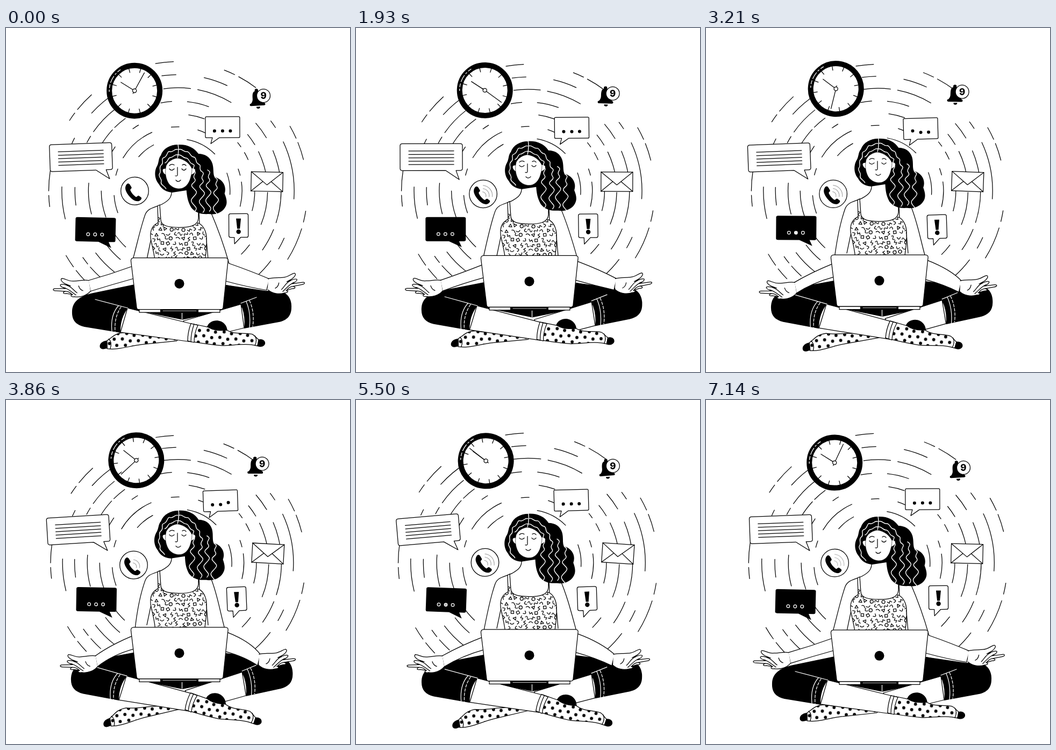
An HTML page for the animation above (7210 ms loop, 640 by 640 pixels).

```html
<!DOCTYPE html>
<html lang="en">
<head>
<meta charset="utf-8">
<title>Calm among notifications</title>
<style>
html, body { margin: 0; width: 100%; height: 100%; overflow: hidden; background: #fff; }
svg { display: block; width: 100%; height: 100%; }
.line { fill: none; stroke: #000; }
.paper { fill: #fff; stroke: #000; }
.ink { fill: #000; stroke: none; }
.chalk { fill: none; stroke: #fff; }
</style>
</head>
<body>
<svg viewBox="0 0 640 640" stroke-width="1.25" stroke-linecap="round" stroke-linejoin="round">
  <defs>
    <pattern id="dots" width="30" height="22" patternUnits="userSpaceOnUse" patternTransform="translate(0 -2) rotate(6)">
      <circle cx="6" cy="5" r="2.900"/><circle cx="21" cy="7" r="2.900"/>
      <circle cx="13" cy="16" r="2.900"/><circle cx="27" cy="18" r="2.900"/>
    </pattern>
    <clipPath id="shirtClip"><use href="#shirt"/></clipPath>
    <path id="strand" d="M0 0c11 6 -3 9 3 16s-10 9 -4 16s11 8 5 15s-10 9 -4 16s9 8 4 14"/>
  </defs>
  <rect width="640" height="640" fill="#fff"/>
  <g id="rings" class="line"></g>

  <g id="clock">
    <circle class="paper" r="47" stroke-width="10"/>
    <path class="chalk" d="M-47 2A47 47 0 0 1 -24 -40.500" stroke-dasharray="3 4 6 4 13 4" stroke-width="1.3"/>
    <g id="ticks" class="line"></g>
    <path class="line" d="M0 0L-25.500 -15.500"/>
    <path id="minute" class="line" d="M-6 0H38"/>
    <circle class="paper" r="3.600"/>
  </g>

  <g id="bell">
    <g id="bellBody" class="ink">
      <circle cx="-1" cy="-14" r="3.200"/>
      <path d="M-9 1C-9 -9 -8 -13 -1 -13S8 -9 8 1C8 6 11 8 13 11H-13C-11 8 -9 6 -9 1Z"/>
      <rect x="-15" y="10" width="29" height="4.500" rx="2.200"/>
      <path d="M-3 16.500H4Q4 20 .5 20T-3 16.500Z"/>
    </g>
    <circle class="paper" cx="12.500" cy="-4" r="12.500"/>
    <text x="12.500" y="2" text-anchor="middle" font-family="Inter, 'Open Sans', sans-serif" font-weight="800" font-size="17">9</text>
  </g>

  <g id="chat">
    <path class="paper" d="M-30 -20H30Q32 -20 32 -18V17Q32 19 30 19H-6L-22 30L-19 19H-30Q-32 19 -32 17V-18Q-32 -20 -30 -20Z"/>
    <g id="chatDots" class="ink"><circle cx="-15" cy="6.500" r="3"/><circle cy="6.500" r="3"/><circle cx="14.500" cy="6.500" r="3"/></g>
  </g>

  <g id="note">
    <path class="paper" d="M-54 -25H54Q58 -25 58 -21V21Q58 25 54 25H46L52 42L27 25H-54Q-58 25 -58 21V-21Q-58 -25 -54 -25Z"/>
    <path class="line" d="M-42 -11.500H42M-42 -5H42M-42 1.300H42M-42 7.500H42M-42 13.800H42"/>
  </g>

  <g id="dark">
    <path class="ink" d="M-34 -23H34Q37.500 -23 37.500 -20V19Q37.500 22 34 22H25L30 33L6 22H-34Q-37.500 22 -37.500 19V-20Q-37.500 -23 -34 -23Z"/>
    <g id="typing" fill="#fff" stroke="#fff" fill-opacity="0"><circle cx="-13.500" cy="8.500" r="2.800"/><circle cx="-.5" cy="8.500" r="2.800"/><circle cx="12.500" cy="8.500" r="2.800"/></g>
  </g>

  <g id="phone">
    <circle class="paper" r="25.800"/>
    <path class="ink" d="M-16 -11C-14 -15 -11 -15 -9 -12L-6 -7C-5 -4 -9 -4 -8 -1C-6 4 -2 8 2 11C4 12 5 8 8 9L12 12C14 14 11 18 7 19C-1 20 -8 13 -13 6C-17 0 -19 -6 -16 -11Z"/>
    <g id="signal" fill="none" stroke="#aaa"><path d="M-1 -4A7 7 0 0 1 5 5"/><path d="M0 -10A13 13 0 0 1 11 5"/><path d="M0 -16A19 19 0 0 1 17 5"/></g>
  </g>

  <g id="mail">
    <rect class="paper" x="-29.500" y="-18" width="59" height="36"/>
    <path class="line" d="M-29.500 -18L0 6L29.500 -18M-29.500 18L-8 0M29.500 18L8 0"/>
  </g>

  <g id="alert">
    <path class="paper" d="M-15 -22H15Q18 -22 18 -19V19Q18 22 15 22H4L-7.500 34L-8 22H-15Q-18 22 -18 19V-19Q-18 -22 -15 -22Z"/>
    <path class="ink" d="M-4.500 -13H4.500L2.500 6H-2.500Z"/><circle class="ink" cy="11.500" r="4.200"/>
  </g>

  <path id="lap" class="ink" d="M200 487L240 478H408L450 486L440 520L328 543L220 521Z"/>
  <g id="rightLeg">
    <path class="paper" d="M437 514L330 545L345 582L443 558Z"/>
    <path class="ink" d="M402 477L484 489H506C523 490 532 504 531 520C531 536 522 544 508 547L443 559Q446 533 436 513L400 521Z"/>
    <path class="chalk" d="M466 501L437 512M447 509Q456 530 453 557"/>
    <path class="chalk" d="M453 507Q463 530 459 555" stroke-dasharray="5 3"/>
  </g>
  <g id="leftFoot">
    <path id="backSock" d="M322 574L262 570C248 570 234 570 220 567C202 568 198 576 188 582L188 597C208 600 228 592 252 589L318 582Z"/>
    <path class="ink" d="M188 582C178 583 173 589 175 595C178 600 185 597 189 596Z"/>
    <path class="line" d="M191 579Q198 584 194 597"/>
  </g>
  <g id="leftLeg">
    <path class="paper" d="M226 521L352 552L345 584L213 566Z"/>
    <path class="ink" d="M244 476L162 493C140 498 124 507 123 526C122 544 130 552 146 556L213 567Q212 540 227 521L262 528Z"/>
    <path class="chalk" d="M166 505L227 521M209 517Q194 534 197 564"/>
    <path class="chalk" d="M214 519Q201 538 203 565" stroke-dasharray="5 3"/>
  </g>
  <path id="seam" class="chalk" d="M327.500 530V542"/>
  <g id="rightFoot">
    <path id="frontSock" d="M345 550L378 557L410 562C426 572 442 566 458 570C464 573 466 578 470 580L468 592C446 586 424 591 402 591C378 589 360 586 338 582Z"/>
    <path class="paper" d="M344 550L357 553Q350 568 350 585L338 582Q338 566 344 550Z"/>
    <path class="line" d="M350 551Q344 568 344 583M463 573Q468 581 463 591"/>
    <path class="ink" d="M374 556C378 545 391 542 400 546C408 550 411 556 412 563C398 564 386 564 374 556ZM470 580C477 578 483 582 482 588C480 594 472 595 467 592Z"/>
  </g>

  <path id="leftArm" class="paper"/>
  <path id="rightArm" class="paper"/>
  <g id="leftHand">
    <path id="hand" class="paper" d="M154 470C145 468 136 471 126 471C116 472 110 466 104 466C100 468 104 473 110 476L120 480C112 479 104 475 101 478C100 481 105 483 111 485L91 485C86 485 87 489 93 489L110 490C104 492 106 495 112 494L124 496C118 497 121 501 127 500C138 502 150 498 157 490"/>
    <path id="fingers" class="line" d="M113 479C122 481 126 489 132 493M107 483C116 485 121 491 130 497M110 490Q117 490 122 495M135 480Q137 487 143 489"/>
  </g>
  <g id="rightHand"><use href="#hand"/><use href="#fingers"/></g>

  <g id="torso">
    <path id="trunk" fill="#fff"/>
    <path id="sides" class="line"/>
    <path id="shirt" class="paper" d="M282 331L286 329L288 357C289 369 304 371 322 371S357 369 358 354V342H359L360 364C370 370 374 384 373 396C374 410 371 420 369 445H278C278 424 271 405 269 390C268 376 272 368 283 362Z"/>
    <g id="print" class="line" clip-path="url(#shirtClip)"></g>
    <g id="hair">
      <path class="ink" d="M320 217C305 217 292 224 288 237C283 243 285 250 281 257C275 268 277 282 285 291C290 300 298 305 310 306L336 302C337 312 338 322 345 334C352 343 362 347 378 346C390 348 402 344 408 334C413 326 411 318 407 308C411 296 405 282 388 277C385 270 387 262 384 252C380 240 370 234 358 234C350 222 336 216 320 217Z"/>
      <g class="chalk" stroke-width="1.4">
        <path d="M320 217Q322 228 319 243M319 226c-6 -2 -8 6 -14 4s-4 9 -11 11s1 10 -5 14s1 11 -3 16s5 9 3 15s7 8 9 13M319 236c-5 -2 -8 5 -13 5s-4 8 -10 10M321 226c6 -3 9 5 15 4s6 9 13 10s2 10 9 13s0 8 5 13M321 236c6 -1 8 6 14 6s5 9 12 11s0 6 2 11"/>
        <use href="#strand" x="348" y="264"/><use href="#strand" x="363" y="266"/>
        <use href="#strand" x="375" y="264"/><use href="#strand" x="389" y="278"/>
      </g>
    </g>
    <path fill="#fff" d="M298 262Q290 261 292 267T300 273ZM345 261Q353 261 352 266T344 273Z"/>
    <path class="paper" stroke-width=".6" d="M319 242C310 243 302 248 298 256C295 268 297 282 304 291C310 297 316 299 322 299C331 299 338 293 342 283C344 277 346 270 346 262C342 252 332 244 319 242Z"/>
    <path class="line" d="M304 262q4 5 9 0M327 262q4 5 8 0M304 256q4 -4 9 -1M328 255q4 -3 7 1M319 259V273q0 3 -4 2M316 283q4 5 9 0"/>
  </g>

  <g id="laptop">
    <path class="paper" d="M238 428H408Q414 428 413 434L404 520Q403.500 524 400 524H247Q243.500 524 243 520L232.500 434Q232 428 238 428Z"/>
    <rect class="paper" x="248" y="524" width="150" height="5.500"/>
    <rect class="ink" x="287" y="524" width="71" height="6"/>
    <path class="chalk" d="M292 526.500H354" stroke-width=".8"/>
    <circle class="ink" cx="322.500" cy="476" r="9"/>
  </g>
</svg>
<script>
const LOOP = 7210, FRAME = LOOP / 101, TAU = Math.PI * 2;
const $ = id => document.getElementById(id);
const add = (parent, tag, attrs) => {
  const el = document.createElementNS('http://www.w3.org/2000/svg', tag);
  for (const name in attrs) el.setAttribute(name, attrs[name]);
  return parent.appendChild(el);
};
const place = (id, x, y, turn = 0, extra = '') =>
  $(id).setAttribute('transform', `translate(${x} ${y}) rotate(${turn}) ${extra}`);
const pivot = (id, cx, cy, x, y, turn) =>
  $(id).setAttribute('transform', `translate(${x} ${y}) rotate(${turn} ${cx} ${cy})`);
const clamp = v => Math.max(0, Math.min(1, v));

// Each ring: radius followed by start and end angles of its dashes.
const rings = [
  [240, -100, -92, -69, -64, -62, -53, -30, -24, -22, -14, 9, 14, 17, 32, 136, 142, 144, 150, 173, 178, 180, 189, 213, 217, 219, 228],
  [216, -98, -91, -77, -65, -37, -33, -25, 4, 24, 30, 37, 48, 132, 139, 141, 145, 166, 182, 204, 207, 222, 238],
  [192, -98, -83, -79, -59, -41, -31, -23, -10, -1, 18, 22, 35, 128, 143, 172, 182, 208, 212, 215, 232],
  [167, -101, -94, -84, -70, -39, -31, -26, -12, 1, 22, 37, 45, 130, 143, 165, 185, 211, 223, 225, 234],
  [143, -126, -121, -82, -70, -39, -35, -30, -24, -5, 15, 133, 147, 160, 180, 205, 215],
  [119, -96, -89, -72, -57, -20, -14, -8, 14, 160, 176, 194, 200, 211, 246],
  [96, -80, -45, -20, 4, 221, 242]
].map(([radius, ...angles]) => ({ radius, angles, path: add($('rings'), 'path', {}) }));

function drawRing({ radius, angles, path }, p) {
  const depth = (radius - 119) / 121;
  const r = radius + 1.8 - 3.3 * depth + (2 + 1.5 * depth) * Math.cos(TAU * (p - .6 - .25 * depth));
  const point = a => `${320 + r * Math.cos(a * TAU / 360)} ${303 + r * Math.sin(a * TAU / 360)}`;
  let d = '';
  for (let i = 0; i < angles.length; i += 2)
    d += `M${point(angles[i])}A${r} ${r} 0 0 1 ${point(angles[i + 1])}`;
  path.setAttribute('d', d);
}

for (let a = 15; a < 360; a += 30) add($('ticks'), 'path', { d: 'M35 0H42', transform: `rotate(${a})` });

for (const [id, foot] of [['backSock', 'leftFoot'], ['frontSock', 'rightFoot']]) {
  const sock = $(id), base = sock.cloneNode();
  base.removeAttribute('id');
  base.setAttribute('class', 'paper');
  $(foot).insertBefore(base, sock);
  sock.setAttribute('fill', 'url(#dots)');
}

// Scattered confetti print on the top.
let seed = 7;
const random = () => (seed = seed * 16807 % 2147483647) / 2147483647;
const motifs = ['M-3 0a3 3 0 1 0 6 0a3 3 0 1 0 -6 0', 'M-3 2L0 -3L3 2Z', 'M-2.500 -2.500h5v5h-5Z',
  'M-4 1q2 -5 4 0t4 0', 'M-3 2q0 -5 6 -4', 'M-3 -2q3 7 6 0', 'M-4 -1l3 3l2 -4l3 3'];
for (let y = 346, row = 0; y < 446; y += 9, row++)
  for (let x = 268 + row % 2 * 5; x < 376; x += 11)
    add($('print'), 'path', {
      d: motifs[Math.floor(random() * motifs.length)],
      transform: `translate(${x + random() * 3} ${y + random() * 3}) rotate(${random() * 360})`
    });

function drawTorso(squeeze) {
  const left = 234 + squeeze, right = 415 - 1.3 * squeeze;
  const leftSide = `M308 298C310 315 303 321 290 328C274 335 264 335 259 347C250 372 244 402 ${left} 438`;
  const rightSide = `C393 370 ${right - 10} 402 ${right} 438`;
  $('trunk').setAttribute('d', `${leftSide}L244 470H404L${right} 438C${right - 10} 402 393 370 380 340L336 298Z`);
  $('sides').setAttribute('d', `${leftSide}M380 340${rightSide}M270 392L262 430M373 395L376 430`);
}

function draw(now) {
  const p = Math.floor((now % LOOP + 5) / FRAME) / 101;
  const cos = phase => Math.cos(TAU * (p - phase));
  const rise = phase => (1 - cos(phase)) / 2;

  rings.forEach(ring => drawRing(ring, p));

  const drift = rise(.1), breath = rise(0);
  place('clock', 238.8 + 3.7 * drift, 117.2 - 5.2 * drift, 7 * drift);
  $('minute').setAttribute('transform', `rotate(${360 * p - 62})`);
  place('bell', 466.5 - 2.5 * breath, 130 - 7.5 * breath);
  place('bellBody', .6 + cos(.86), 0, -1.5 - 3.5 * cos(.86));
  place('chat', 403 - 4 * rise(.05), 185 + 3 * rise(.05), -2 * drift);
  place('note', 141 - 7.5 * rise(.15), 240 + 1.5 * rise(.15), -5 * rise(.22));
  place('dark', 166.3 + 2 * drift, 376 - 4.6 * drift, 1 + cos(.8));
  place('phone', 238.3 + 2 * cos(.85), 305.5 - 3.8 * cos(.85));
  place('mail', 485 + 2.7 * rise(.15), 286 - .5 * rise(.15), 4 * rise(.19));
  place('alert', 433 - 4 * drift, 367.2 + 3 * drift, -2.5 * drift);

  const beat = p * 3 % 1, ring = p * 6 % 1;
  [...$('chatDots').children].forEach((dot, i) =>
    dot.setAttribute('cy', 6.5 - 3.2 * clamp(2 - Math.abs(beat - .385 - .09 * i) / .05)));
  [...$('typing').children].forEach((dot, i) =>
    dot.setAttribute('fill-opacity', clamp(1 - Math.abs(beat - .15 - .175 * i) / .12)));
  [...$('signal').children].forEach((arc, i) =>
    arc.setAttribute('opacity', clamp((ring - .06 - .07 * i) / .08) * clamp((.985 - ring) / .06)));

  const dip = rise(.15) ** 1.6, reach = rise(.05) ** 1.3;
  const lift = -11.5 * breath, squeeze = 6 * reach;
  place('torso', 0, lift);
  drawTorso(squeeze);
  $('hair').setAttribute('transform', `translate(320 240) skewX(${-3 * drift}) translate(-320 -240)`);
  const seat = -6 * rise(.916) ** 1.15;
  for (const id of ['laptop', 'lap', 'seam']) place(id, 0, seat);

  const footTurn = -1 + 10.2 * dip;
  pivot('leftLeg', 345, 568, -3 * breath, -5 * breath, 1.3 * breath);
  pivot('rightLeg', 345, 568, 4 * breath, -5 * breath, -1.8 * breath);
  pivot('rightFoot', 345, 567, -3 * breath, -5 * breath, footTurn);
  pivot('leftFoot', 305, 578, 4 * breath, -5 * breath, -footTurn);

  const handY = .8 * (-1.2 + 11 * dip), leftX = 13 * reach, rightX = -17 * reach;
  pivot('leftHand', 154, 480, leftX, handY, -2 * dip);
  place('rightHand', 489 + rightX, 477 + handY, -8 + 2 * dip, 'scale(-1 1) translate(-154 -480)');
  const elbow = lift * .5, under = lift * .25;
  $('leftArm').setAttribute('d', `M250 ${438 + elbow}L${236 + squeeze / 2} ${443 + elbow}Q195 ${458 + under} ${153 + leftX} ${470 + handY}` +
    `L${157 + leftX} ${490 + handY}Q198 ${477 + under} 238 ${466 + under}L250 462`);
  $('rightArm').setAttribute('d', `M400 ${432 + elbow}L${415 - squeeze / 2} ${438 + elbow}Q455 ${452 + under} ${490 + rightX} ${467 + handY}` +
    `L${485 + rightX} ${488 + handY}Q445 ${481 + under} 409 ${471 + under}L400 468`);

  requestAnimationFrame(() => draw(performance.now()));
}
draw(0);
</script>
</body>
</html>
```
